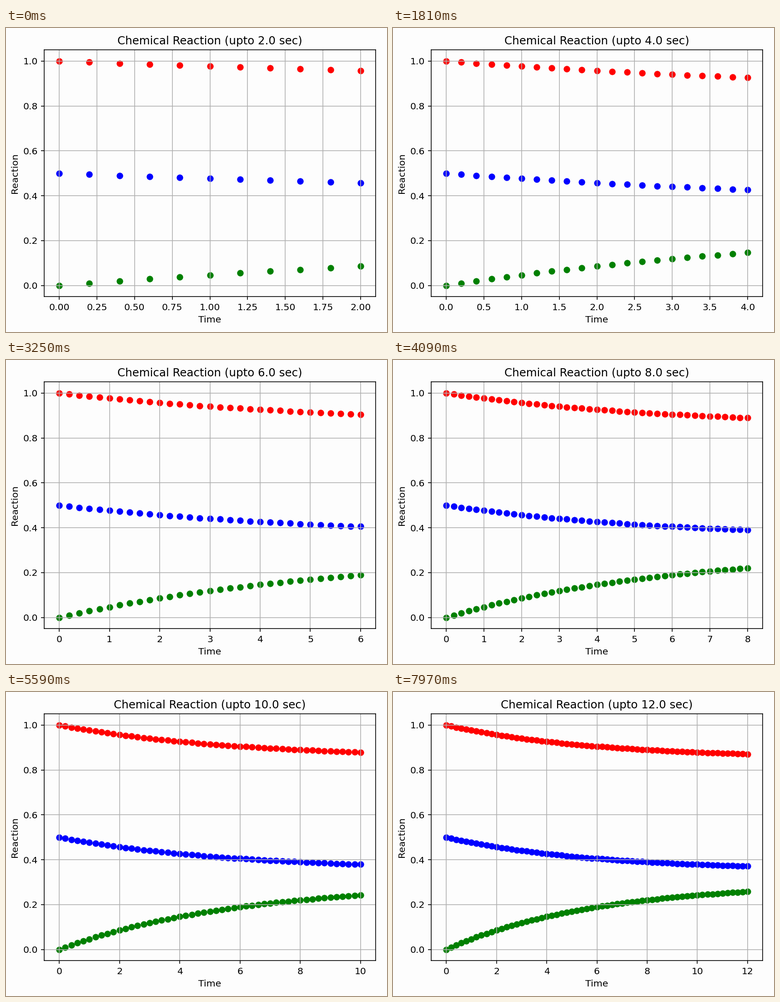
These frames come from a looping animation (838 px wide and 669 px high, 7.99 s). A matplotlib script:

```python
import numpy as np
import matplotlib.pyplot as plt
from matplotlib.animation import FuncAnimation

W, H, DPI = 838, 669, 147
LEFT, RIGHT, TOP, BOTTOM = 84, 813, 48.2, 591.3
PAPER = "#fdfdfd"

FRAMES, INTERVAL = 170, 47      # 7990 ms per loop
HOLD, LEAD = 33, 15             # frames per stage, frames already elapsed
SPAN, DT = 2.0, 0.2             # seconds added per stage, time step
STAGES = (FRAMES - 1 + LEAD) // HOLD + 1
K_FWD = K_BACK = 0.05


def react(steps):
    """Euler steps of A + B <-> 2C; rows are (A, B, C)."""
    state = np.array([1.0, 0.5, 0.0])
    rows = [state]
    for _ in range(steps):
        a, b, c = state
        rate = K_FWD * a * b - K_BACK * c
        state = state + DT * rate * np.array([-1, -1, 2])
        rows.append(state)
    return np.array(rows)


amounts = react(round(STAGES * SPAN / DT))
times = DT * np.arange(len(amounts))

# the tiny surplus keeps the pixel size from being truncated
fig = plt.figure(figsize=((W + 1e-6) / DPI, (H + 1e-6) / DPI), dpi=DPI,
                 facecolor=PAPER)
ax = fig.add_axes([LEFT / W, 1 - BOTTOM / H,
                   (RIGHT - LEFT) / W, (BOTTOM - TOP) / H], facecolor=PAPER)
ax.set_xlabel("Time")
ax.set_ylabel("Reaction")
ax.set_ylim(-0.05, 1.05)
ax.grid(True)
title = ax.set_title("")
dots = [ax.scatter([], [], color=c) for c in ("red", "blue", "green")]


def update(i):
    end = SPAN * ((i + LEAD) // HOLD + 1)
    n = round(end / DT) + 1
    for dot, series in zip(dots, amounts.T):
        dot.set_offsets(np.column_stack([times[:n], series[:n]]))
    ax.set_xlim(-0.05 * end, 1.05 * end)
    title.set_text(f"Chemical Reaction (upto {end:.1f} sec)")
    return [*dots, title]


anim = FuncAnimation(fig, update, frames=FRAMES, interval=INTERVAL,
                     repeat=True, repeat_delay=0, blit=False)
plt.show()
```
